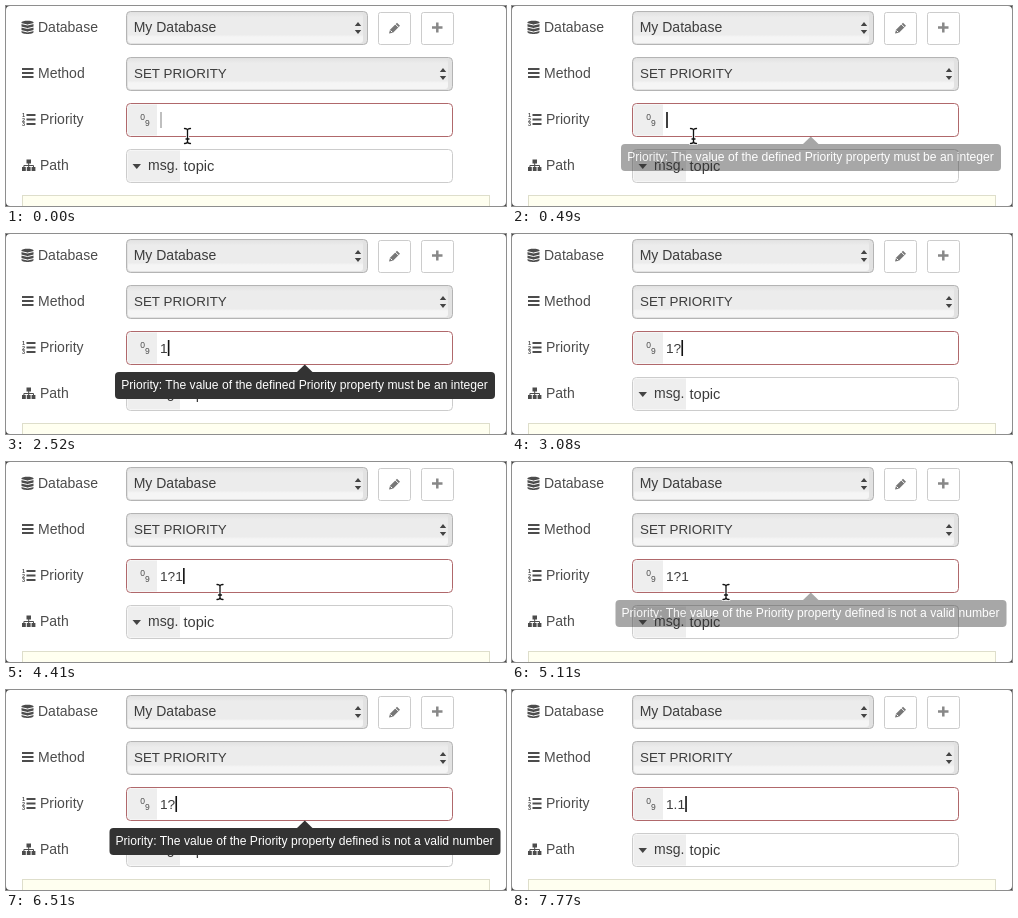
These frames come from a looping animation (500x200 px, 8 s). An HTML page:

```html
<!DOCTYPE html>
<html lang="en">
<head>
<meta charset="utf-8">
<title>Priority field validation</title>
<style>
  html, body { margin: 0; width: 100%; height: 100%; overflow: hidden; background: #444; }
  svg { display: block; font: 14px "Liberation Sans", Arial, sans-serif; fill: #4c4c4c; }
  .field { fill: #fff; stroke: #ccc; }
  .select { fill: #e2e2e2; stroke: #b4b4b4; }
  .type { fill: #eee; }
  .value { fill: #3c3c3c; }
  .tip { fill: #333; }
  .tip text { fill: #fff; font-size: 12.12px; text-anchor: middle; }
  .line { fill: none; stroke: #4c4c4c; stroke-width: 2; }
  .beam { fill: none; stroke-linecap: round; }
</style>
</head>
<body>
<svg width="500" height="200" viewBox="0 0 500 200">
  <defs>
    <linearGradient id="shade" x2="0" y2="1">
      <stop offset="0" stop-color="#e4e4e4"/>
      <stop offset=".15" stop-color="#ececec"/>
      <stop offset=".72" stop-color="#ececec"/>
      <stop offset=".8" stop-color="#f5f5f5"/>
      <stop offset="1" stop-color="#f5f5f5"/>
    </linearGradient>
    <path id="arrows" d="M-3.2 -2L0 -6L3.2 -2ZM-3.2 2L0 6L3.2 2Z" fill="#444"/>
    <path id="beam" d="M-3 -7.500Q0 -7.500 0 -5.500V5.500Q0 7.500 -3 7.500M3 -7.500Q0 -7.500 0 -5.500V5.500Q0 7.500 3 7.500M-1.500 3H1.500"/>
  </defs>
  <rect width="500" height="200" rx="4" fill="#fff"/>

  <!-- labels and icons -->
  <text x="32" y="26">Database</text>
  <text x="32" y="72">Method</text>
  <text x="34" y="118">Priority</text>
  <text x="34" y="164">Path</text>
  <path d="M15.500 16.500C15.500 14 27.500 14 27.500 16.500V26C27.500 28.600 15.500 28.600 15.500 26Z"/>
  <path d="M15 17.500Q21.500 20.500 28 17.500M15 21Q21.500 24 28 21M15 24.500Q21.500 27.500 28 24.500" fill="none" stroke="#fff"/>
  <path class="line" d="M16 63H27.500M16 67H27.500M16 71H27.500"/>
  <path class="line" d="M20.500 109H29.500M20.500 113.500H29.500M20.500 118H29.500"/>
  <g font-size="5.500" font-weight="bold">
    <text x="16" y="111">1</text><text x="16" y="115.700">2</text><text x="16" y="120.400">3</text>
  </g>
  <path d="M20.500 153.500h4.500v4h-4.500zM16 161h3.800v4h-3.800zM20.800 161h3.800v4h-3.800zM25.600 161h3.800v4h-3.800z"/>
  <path class="line" style="stroke-width:1" d="M22.700 157V161M17.900 161V159.500H27.500V161"/>

  <!-- database row -->
  <rect class="select" x="120.500" y="5.500" width="241" height="33" rx="4"/>
  <rect x="122" y="7" width="235" height="30" rx="3" fill="url(#shade)"/>
  <text class="value" x="127.700" y="26">My Database</text>
  <use href="#arrows" x="352" y="22"/>
  <rect class="field" x="372.500" y="6.500" width="32" height="32" rx="2"/>
  <rect class="field" x="415.500" y="6.500" width="32" height="32" rx="2"/>
  <path d="M383 27.500L384 23.800L391 16.800L394 19.800L387 26.800Z" fill="#777"/>
  <path d="M389.200 18L392.700 21.500M384.500 24.500L386.300 26.300" stroke="#fff"/>
  <path d="M426 21.500H436.500M431.300 16.500V26.500" stroke="#888" stroke-width="2.500"/>

  <!-- method row -->
  <rect class="select" x="120.500" y="51.500" width="326" height="33" rx="4"/>
  <rect x="122" y="53" width="320" height="30" rx="3" fill="url(#shade)"/>
  <text class="value" x="128" y="72" font-size="13.400">SET PRIORITY</text>
  <use href="#arrows" x="437" y="68"/>

  <!-- priority row -->
  <rect id="input" class="field" x="120.500" y="97.500" width="326" height="33" rx="4"/>
  <path class="type" d="M151 98.500H124.500Q121.500 98.500 121.500 101.500V126.500Q121.500 129.500 124.500 129.500H151Z"/>
  <text x="134.200" y="113.500" font-size="8.500">0</text>
  <text x="139" y="119.500" font-size="8.500">9</text>
  <text id="typed" class="value" x="154" y="119" font-size="13.700"></text>
  <rect id="caret" y="106" width="1.600" height="16" fill="#111"/>

  <!-- path row -->
  <rect class="field" x="120.500" y="143.500" width="326" height="33" rx="4"/>
  <path class="type" d="M174 144.500H124.500Q121.500 144.500 121.500 147.500V172.500Q121.500 175.500 124.500 175.500H174Z"/>
  <path d="M126.500 158H135L130.750 163Z" fill="#444"/>
  <text class="value" x="142" y="164">msg.</text>
  <text class="value" x="177.500" y="165" font-size="14.600">topic</text>

  <rect x="16.500" y="189.500" width="467" height="20" fill="#fffff0" stroke="#dedecb"/>

  <g id="tip" class="tip">
    <path d="M290.500 138.500L298.800 130.500L307 138.500Z"/>
    <rect id="tipBox" y="138" height="27" rx="4"/>
    <text id="tipText" x="298.500" y="155"></text>
  </g>
  <g id="mouse" class="beam">
    <use href="#beam" stroke="#fff" stroke-width="3"/>
    <use href="#beam" stroke="#111" stroke-width="1.300"/>
  </g>
</svg>
<script>
  const LOOP = 8000, TICK = 70;
  const [input, typed, caret, tip, tipBox, tipText, mouse] =
    ["input", "typed", "caret", "tip", "tipBox", "tipText", "mouse"].map(id => document.getElementById(id));

  const clamp = v => Math.max(0, Math.min(1, v));
  const within = (t, a, b) => t >= a && t < b;
  const latest = (list, t) => list.filter(([start]) => start <= t).pop();

  // [start, text]
  const typing = [[0, ""], [2520, "1"], [3080, "1?"], [3360, "1?1"], [6510, "1?"], [6930, "1"], [7630, "1."], [7770, "1.1"]];
  // [start, direction]: each blink fades over three ticks, a key press shows the caret at once
  const blinks = [[-70, 0], [280, 1], [980, 0], [1330, 1], [2030, 0], [2450, 1], [3010, 0], [3920, 0],
    [4270, 1], [4970, 0], [5390, 1], [6090, 0], [6440, 1], [7420, 0]];
  // [start, end, half width, message]
  const tips = [
    [420, 2590, 190, "Priority: The value of the defined Priority property must be an integer"],
    [5040, 6930, 195.5, "Priority: The value of the Priority property defined is not a valid number"]
  ];

  function caretAlpha(t, keyTime) {
    const [start, on] = latest(blinks, t);
    if (keyTime > 0 && keyTime >= start) return 1;
    const p = clamp((t - start + TICK) / (3 * TICK));
    return on ? p : 1 - p;
  }

  function draw(now) {
    const t = Math.floor(now % LOOP / TICK) * TICK;

    const [keyTime, text] = latest(typing, t);
    typed.textContent = text;
    caret.setAttribute("x", 154.2 + (text ? typed.getComputedTextLength() : 0));
    caret.setAttribute("opacity", caretAlpha(t, keyTime));

    const valid = within(t, 2590, 3080) || within(t, 6930, 7630);
    input.style.stroke = valid ? "#77abeb" : "#b0686b";

    const shown = tips.find(([a, b]) => within(t, a, b));
    tip.setAttribute("opacity", shown ? clamp((t - shown[0] + 20) / 210) : 0);
    if (shown) {
      tipBox.setAttribute("x", 299 - shown[2]);
      tipBox.setAttribute("width", 2 * shown[2]);
      tipText.textContent = shown[3];
    }

    const away = (1 - clamp((t - 4060) / 280)) ** 2;
    const [x, y] = t < 2520 ? [181.5, 130] : [214 + 10 * away, 130 + 12 * away];
    mouse.setAttribute("transform", `translate(${x} ${y})`);
    mouse.setAttribute("visibility", t < 2520 || within(t, 4060, 6510) ? "visible" : "hidden");
  }

  const begin = performance.now();
  (function frame() {
    draw(performance.now() - begin);
    requestAnimationFrame(frame);
  })();
</script>
</body>
</html>
```
